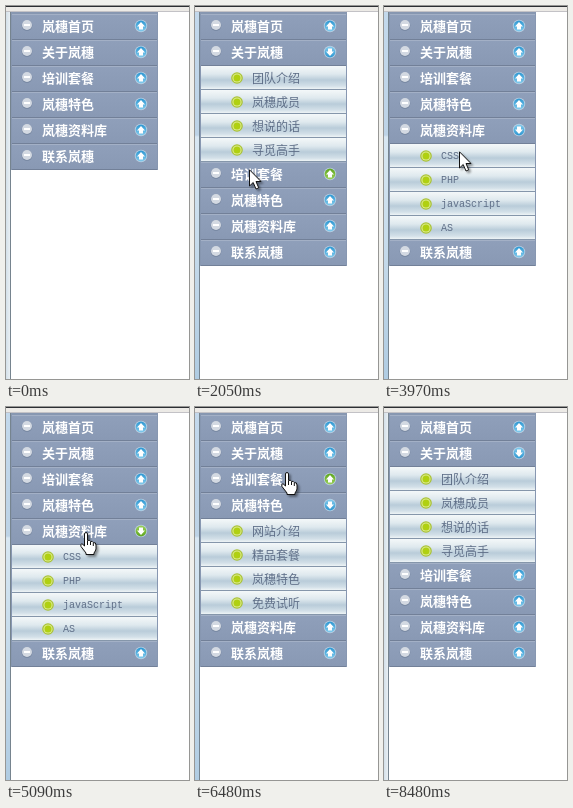
Recreate the animation shown at these times as an HTML page. Size 183 px wide and 373 px high, loop 8710 ms.

```html
<!DOCTYPE html>
<html lang="zh-CN">
<head>
<meta charset="utf-8">
<title>Accordion menu</title>
<style>
html, body { margin: 0; width: 100%; height: 100%; overflow: hidden; background: #fff; }
#stage { position: absolute; left: 0; top: 0; width: 183px; height: 373px; overflow: hidden; background: #fff; }
#top { position: absolute; left: 0; top: 0; width: 183px; height: 6px;
  background: linear-gradient(#2c2f33 1px, #eceae6 1px 5px, #c3c2c6 5px); }
#edge { position: absolute; left: 0; top: 1px; width: 4px; height: 372px;
  background: linear-gradient(90deg, #d3e0e9, #e9eff3); }
#edge.active { background: linear-gradient(#c3d9ec 0, #bdd3e6 128px, #d8e7f2 130px, #b0cce2 100%); }
#line { position: absolute; left: 4px; top: 1px; width: 1px; height: 372px; background: #76848f; }
#menu { position: absolute; left: 5px; top: 6px; width: 145px; padding: 2px 1px 0; background: #8797b1; }
.head, .item { position: relative; box-sizing: border-box; white-space: nowrap; }
.head { height: 26px; padding-left: 30px; color: #fff;
  font: bold 13px/24px "Noto Sans CJK SC", "Noto Sans CJK", sans-serif;
  background: linear-gradient(#a3b0c6 1px, #8f9fba 1px, #8999b4 25px, #728098 25px); }
.item { height: 24px; padding-left: 51px; color: #5f6f88;
  font: 12px/24px "Noto Sans CJK SC", "Noto Sans CJK", sans-serif;
  background: linear-gradient(#f4f8f9, #dfe9ee 8px, #b9ccd9 14px, #d3e0e8 20px, #eef4f6 23px, #8596aa 23px); }
.item.code { font: 10px/25px "Liberation Mono", monospace; }
.sub { display: none; }
.open + .sub { display: block; }
svg { position: absolute; overflow: visible; }
.minus { left: 9px; top: 5px; }
.dot { left: 30px; top: 6px; }
.arrow { left: 122px; top: 5px; }
.open .arrow { transform: rotate(180deg); }
.disc { fill: url(#blue); }
.hover .disc { fill: url(#green); }
.cursor { left: 0; top: 0; filter: drop-shadow(2px 2px 1px #0006); }
</style>
</head>
<body>
<div id="stage">
  <svg width="0" height="0">
    <linearGradient id="blue" x2="0" y2="1"><stop stop-color="#2d97d2"/><stop offset="1" stop-color="#82caec"/></linearGradient>
    <linearGradient id="green" x2="0" y2="1"><stop stop-color="#5ea51d"/><stop offset="1" stop-color="#9bd05a"/></linearGradient>
  </svg>
  <div id="edge"></div><div id="line"></div><div id="top"></div>
  <div id="menu"></div>
  <svg id="hand" class="cursor" width="17" height="24">
    <path d="M4.5 2Q4.5 .5 6 .5T7.5 2V8.5Q9.7 7.5 10.5 9.5Q12.5 8.7 13.3 10.6Q16 10 16 13V17Q15.5 19 14 21V22.5H6V21L1 14.5Q0 12 2 11.700L4.5 14Z" fill="#fff" stroke="#111"/>
    <path d="M7.5 9V13M10.5 10V13M13.3 11V14" fill="none" stroke="#111"/>
  </svg>
  <svg id="point" class="cursor" width="13" height="21">
    <path d="M.5 .8V17L4.2 13.5L7 20L9.7 18.8L7 12.5H12Z" fill="#fff" stroke="#111"/>
  </svg>
</div>
<script>
const LOOP = 8710, TOP = 8, HEAD = 26, ITEM = 24, PRESS = 30;
const $ = id => document.getElementById(id);

const sections = [
  ['岚穗首页', []],
  ['关于岚穗', ['团队介绍', '岚穗成员', '想说的话', '寻觅高手']],
  ['培训套餐', ['基础课程', '进阶课程', '实战套餐', '全套课程']],
  ['岚穗特色', ['网站介绍', '精品套餐', '岚穗特色', '免费试听']],
  ['岚穗资料库', ['CSS', 'PHP', 'javaScript', 'AS']],
  ['联系岚穗', []]
];

const minus = `<svg class="minus" width="12" height="12">
  <circle cx="6" cy="6.5" r="5.3" fill="#73839d"/><circle cx="6" cy="6" r="5" fill="#d3d9e2"/>
  <path d="M3 6H9" stroke="#fff" stroke-width="2"/></svg>`;
const arrow = `<svg class="arrow" width="14" height="14">
  <circle cx="7" cy="7" r="6.2" fill="#b9cfe2"/><circle class="disc" cx="7" cy="7" r="5.4"/>
  <path d="M7 3L11 7.5H9V10.500H5V7.5H3Z" fill="#fff"/></svg>`;
const dot = `<svg class="dot" width="12" height="12">
  <circle cx="6" cy="6" r="5.8" fill="#a9c234"/><circle cx="6" cy="6" r="4.6" fill="#dceb8e"/>
  <circle cx="6" cy="6" r="3.5" fill="#b0d012"/></svg>`;

$('menu').innerHTML = sections.map(([name, items]) =>
  `<div class="head">${minus}${name}${arrow}</div><div class="sub">` +
  items.map(s => `<div class="item${/^\w+$/.test(s) ? ' code' : ''}">${dot}${s}</div>`).join('') +
  '</div>').join('');
const heads = [...document.querySelectorAll('.head')];

// With a section open, every header below it is pushed down.
const headTop = (i, open) =>
  TOP + i * HEAD + (open >= 0 && i > open ? sections[open][1].length * ITEM : 0);

function headAt(p, open) {
  if (!p || p.x < 5 || p.x >= 152) return -1;
  return sections.findIndex((s, i) => {
    const d = p.y - headTop(i, open);
    return d >= 0 && d < HEAD;
  });
}

const moves = [], clicks = [];
let pos = { x: 141, y: 152 }, openNow = -1;

function move(t0, t1, to) {
  moves.push({ t0, t1, from: pos, to });
  pos = to;
}
function go(t0, t1, row, x, dy = 13) {
  move(t0, t1, { x, y: headTop(row, openNow) + dy });
}
// A click toggles whichever header lies under the pointer.
function click(t) {
  const row = headAt(pos, openNow);
  openNow = row === openNow ? -1 : row;
  clicks.push({ t, open: openNow });
}

go(290, 650, 1, 69);
click(880);
go(1270, 1750, 2, 54, 7);
click(2080);
go(2280, 2530, 3, 47, 20);
click(2860);
go(2890, 3160, 5, 47, 2);
go(3280, 3500, 4, 55);
click(3690);
go(3760, 4060, 4, 80);
click(4460);
click(5090);
go(5320, 5500, 3, 83, 1);
go(5730, 5980, 3, 91);
click(6240);
go(6270, 6480, 2, 92, 5);
click(6840);
go(6870, 7120, 1, 93, 6);
click(7380);
move(7400, 7680, { x: 164, y: 286 });

const ENTER = moves[0].t0, LEAVE = moves[moves.length - 1].t1;
const ease = k => k * k * (3 - 2 * k);

function pointer(t) {
  if (t < ENTER || t >= LEAVE) return null;
  const { t0, t1, from, to } = moves.filter(m => m.t0 <= t).pop();
  const k = ease(Math.min(1, (t - t0) / (t1 - t0)));
  const mix = (a, b) => Math.round(a + (b - a) * k);
  return { x: mix(from.x, to.x), y: mix(from.y, to.y) };
}

function place(el, shown, x, y) {
  el.style.display = shown ? 'block' : 'none';
  if (shown) el.style.transform = `translate(${x}px, ${y}px)`;
}

function render(t) {
  const last = clicks.filter(c => c.t <= t).pop();
  const open = last ? last.open : -1;
  const p = pointer(t), over = headAt(p, open);
  heads.forEach((h, i) => {
    h.classList.toggle('open', i === open);
    h.classList.toggle('hover', i === over);
  });
  $('edge').classList.toggle('active', t >= clicks[0].t && t < 8480);
  const pressed = clicks.some(c => t >= c.t - PRESS && t < c.t);
  const isHand = over >= 0 && !pressed;
  place($('hand'), p && isHand, p && p.x - 6, p && p.y);
  place($('point'), p && !isHand, p && p.x, p && p.y);
}

const start = performance.now();
function tick() {
  render((performance.now() - start) % LOOP);
  requestAnimationFrame(tick);
}
tick();
</script>
</body>
</html>
```
